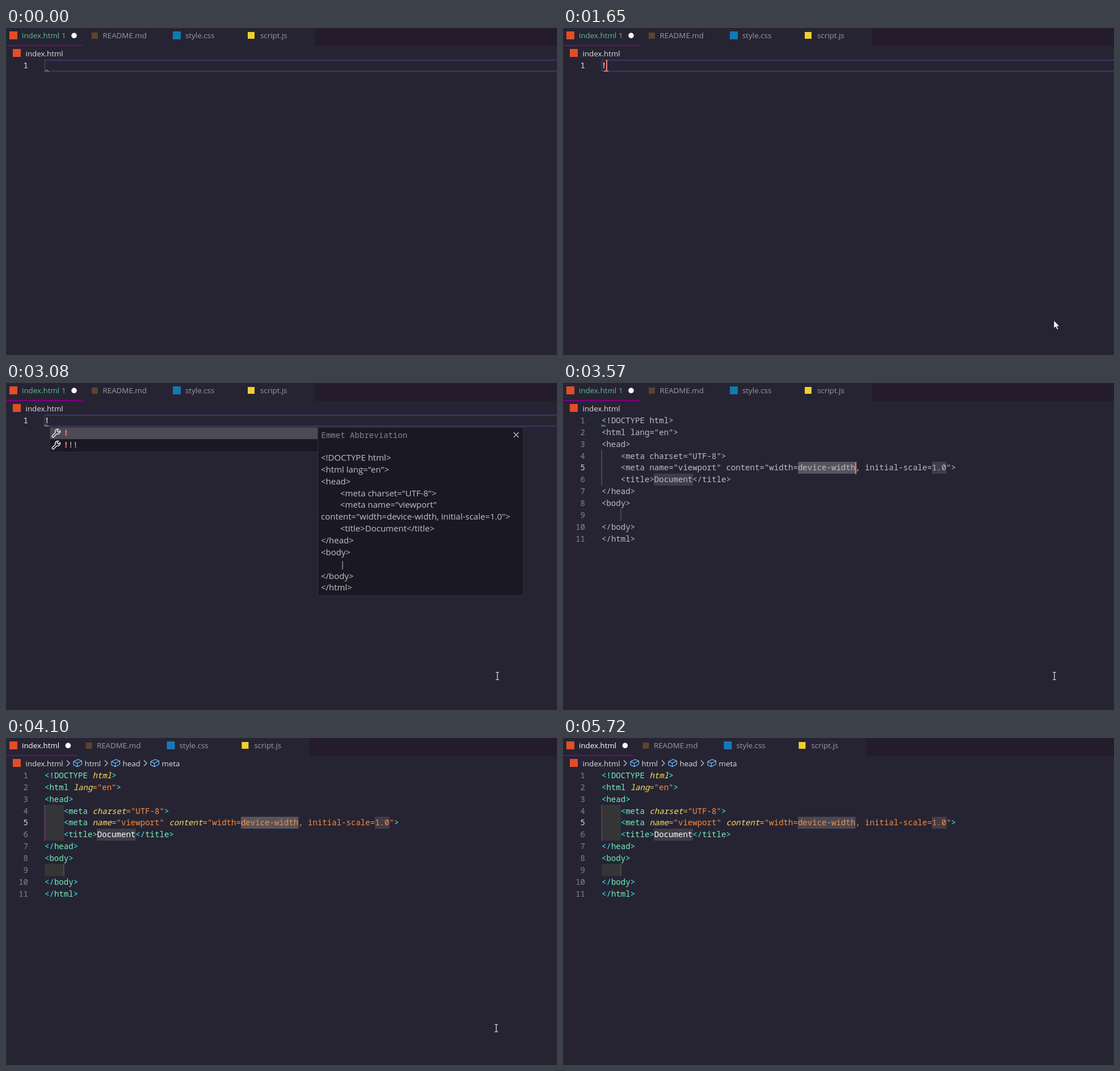
An HTML page that plays this animation: 971x577 px, repeating every 5.78 s.

```html
<!DOCTYPE html>
<html lang="en">
<head>
<meta charset="UTF-8">
<title>Editor abbreviation</title>
<style>
html, body { margin: 0; width: 100%; height: 100%; overflow: hidden; background: #262433; }
svg { display: block; width: 971px; height: 577px; }
text { white-space: pre; }
.ui { font: 13.35px "Open Sans", sans-serif; }
.mono { font: 500 14.07px "Noto Sans Mono", monospace; }
.doc { font: 15px "Open Sans", sans-serif; fill: #c3c1c6; }
.dim { fill: #9b99a2; }
.light { fill: #dedce2; }
.line { fill: none; stroke-width: 1.2; }
#code { fill: #d8a868; }
#code .p { fill: #36f9f6; }
#code .s { fill: #ff8b39; }
#code .a { fill: #fede5d; font-style: italic; }
#code .t { fill: #72f1b8; }
#code .w { fill: #fff; }
#code.plain, #code.plain tspan { fill: #bdbbc0; font-style: normal; }
</style>
</head>
<body>
<svg viewBox="0 0 971 577">
  <rect width="971" height="577" fill="#262433"/>

  <g class="ui">
    <rect x="6" y="6" width="14" height="14" fill="#e44d26"/>
    <text id="tabName" x="28" y="18">index.html</text>
    <text id="problems" x="98" y="18" fill="#5cbd95">1</text>
    <rect id="underline" y="30" height="2" fill="#800085"/>
    <g id="tabs" class="dim">
      <circle cx="120" cy="13.3" r="4.8" fill="#fff"/>
      <rect x="151" y="8" width="11" height="11" fill="#5c432f"/>
      <text x="170.5" y="18">README.md</text>
      <rect x="294" y="6" width="14" height="14" fill="#1478b4"/>
      <text x="316" y="18">style.css</text>
      <rect x="426" y="7" width="12" height="12" fill="#efcf30"/>
      <text x="448" y="18">script.js</text>
      <rect x="545" width="460" height="32" fill="#241b2d"/>
    </g>
    <rect x="12" y="37" width="14" height="14" fill="#e44d26"/>
    <text class="light" x="34.5" y="50">index.html</text>
    <g id="crumbs" class="light"></g>
  </g>

  <g id="entry">
    <rect class="line" x="68.5" y="56.75" width="920" height="19.5" stroke="#463a70" style="stroke-width:1.5"/>
    <text class="mono light" x="39" y="71" text-anchor="end">1</text>
    <text id="bang" class="mono" x="68" y="71" fill="#fff">!</text>
  </g>

  <g id="page">
    <g id="shade" fill="#353538">
      <rect x="68" y="118" width="34" height="63"/>
      <rect x="68" y="222.5" width="34" height="21"/>
    </g>
    <rect x="67.5" y="118" width="1.5" height="63" fill="#64466a"/>
    <rect x="101.5" y="222.5" width="1" height="21" fill="#68666c"/>
    <rect id="selected" x="414" y="139" width="101.5" height="21"/>
    <rect x="650" y="139" width="26" height="21" fill="#3f3d4a"/>
    <rect x="160" y="160" width="69" height="21" fill="#3f3d4a"/>
    <g id="numbers" class="mono" text-anchor="end"></g>
    <g id="code" class="mono"></g>
  </g>

  <path id="hint" class="line"/>

  <g id="popup">
    <rect x="77.5" y="78.5" width="472" height="43.5" fill="#1a1822" stroke="#35333f"/>
    <rect x="78" y="78.5" width="471" height="20.5" fill="#4c4a53"/>
    <g class="line" stroke="#e8e7ea" style="stroke-width:1.4">
      <path id="wrench" transform="translate(80 80) scale(1.05)" d="M12 1.5A4.3 4.3 0 0 0 6.6 7.2L1.6 12.2a1.7 1.7 0 0 0 2.4 2.4L9 9.4A4.3 4.3 0 0 0 14.5 4L11.8 6.6 9.4 4.2z"/>
      <use href="#wrench" y="21"/>
    </g>
    <g class="mono" fill="#c3c1c6">
      <text x="101.5" y="92.5" fill="#f97e72" font-weight="700">!</text>
      <text x="101.5" y="113.5"><tspan fill="#f97e72" font-weight="700">!</tspan>!!</text>
    </g>
    <rect x="549.5" y="78.5" width="362" height="297" fill="#1a1822" stroke="#35333f"/>
    <text class="mono" x="555.5" y="97" fill="#87858c">Emmet Abbreviation</text>
    <path class="line" stroke="#c8c6cb" d="M894.5 87l9 9m0-9l-9 9"/>
    <g id="doc" class="doc"></g>
  </g>

  <rect id="caret" width="2" height="21" fill="#f97e72"/>
  <path id="arrow" fill="#fff" stroke="#111" stroke-width=".7" d="M0 0v14l3.3-3 2.3 5.2 2.2-1-2.2-5h4.2z"/>
  <path id="beam" class="line" stroke="#e4e3e6" d="M-3-6.5h2.2l.8.7.8-.7h2.2M0-6v12.5M-3 6.5h2.2l.8-.7.8.7h2.2"/>
</svg>
<script>
const $ = id => document.getElementById(id);
const PITCH = 20.85, LOOP = 5780;
const lines = [
  '<!DOCTYPE html>', '<html lang="en">', '<head>',
  '    <meta charset="UTF-8">',
  '    <meta name="viewport" content="width=device-width, initial-scale=1.0">',
  '    <title>Document</title>',
  '</head>', '<body>', '    ', '</body>', '</html>'
];

const escape = s => s.replace(/</g, '&lt;').replace(/>/g, '&gt;');
const text = (x, y, body, extra = '') => `<text x="${x}" y="${y}" ${extra}>${body}</text>`;

// punctuation, string, attribute, tag name, plain word
const token = /(<[!\/]?|>)|("[^"]*")|([a-z]+(?==)|(?<=DOCTYPE )html)|((?<=[<!\/])\w+)|(\w+)/g;
const paint = line => line.replace(token, (m, ...groups) =>
  `<tspan class="${'psatw'[groups.slice(0, 5).findIndex(Boolean)]}">${escape(m)}</tspan>`);

$('code').innerHTML = lines.map((l, i) => text(68, 71 + PITCH * i, paint(l))).join('');
$('numbers').innerHTML = lines.map((l, i) =>
  text(39, 71 + PITCH * i, i + 1, `fill="${i === 4 ? '#d8d6dc' : '#85838d'}"`)).join('');

const docLines = lines.join('\n').replace(' content', '\ncontent').split('\n');
$('doc').innerHTML = docLines.map((l, i) =>
  text(l.startsWith(' ') ? 589 : 555, 137 + PITCH * i, escape(l.trim() || '|'))).join('');

$('crumbs').innerHTML = [['html', 139], ['head', 206], ['meta', 275]].map(([name, x]) =>
  `<path class="line" stroke="#c8c6cb" d="M${x - 32} 39.5l5 5-5 5"/>
   <path class="line" stroke="#75beff" d="M${x - 20} 41.5l8-3.5 6.500 2.500v6l-8 4-6.500-3zl6.500 3v6m0-6l8-4"/>` +
  text(x - .5, 50, name)).join('');

const show = (id, on) => $(id).style.display = on ? '' : 'none';
const set = (id, attrs) => { for (const k in attrs) $(id).setAttribute(k, attrs[k]); };
const clamp = v => Math.max(0, Math.min(1, v));
const mix = (a, b, p) => a + (b - a) * p;

const blinks = [350, 820, 1290, 2110, 2600, 3080, 3570, 4100, 4570, 5030, 5530, 5720];

function draw(t) {
  const typed = t >= 1650, expanded = t >= 3570, coloured = t >= 3620, parsed = t >= 3860;

  show('entry', !expanded);
  show('bang', typed);
  show('page', expanded);
  show('popup', t >= 1730 && !expanded);
  show('shade', t >= 3680);
  $('code').setAttribute('class', coloured ? 'mono' : 'mono plain');
  set('selected', { fill: t >= 5720 ? '#494854' : '#56555e' });

  show('problems', !parsed);
  show('crumbs', parsed);
  set('tabName', { fill: parsed ? '#fff' : '#5cbd95' });
  set('underline', { width: parsed ? 124 : 134.5 });
  set('tabs', { transform: `translate(${parsed ? -10.6 : 0})` });

  show('hint', !parsed);
  const fresh = typed && t < 1830;
  set('hint', {
    d: !typed ? 'M68 76.5l2 0 2-2.5 2 2.5h2'
      : fresh ? 'M72 76.5l2 0 2-2.5 2 2.5h2' : 'M67.5 73.5l2 3 2-2.5 2 2.5 2-1.5',
    stroke: fresh ? '#d9c8c4' : '#4cb8a4'
  });

  show('caret', blinks.filter(b => b <= t).length % 2);
  set('caret', { x: expanded ? 515 : typed ? 76 : 67, y: expanded ? 139.5 : 56 });

  const pointing = t < 1750;
  show('arrow', t >= 20 && pointing);
  const enter = 1 - (1 - clamp((t - 20) / 230)) ** 2;
  set('arrow', { transform: `translate(${mix(873, 865, enter)} ${mix(533, 516, enter)})` });

  show('beam', !pointing && t < 4240);
  const drift = clamp((t - 3960) / 140);
  const leave = t < 4160 ? 0 : (Math.floor((t - 4160) / 20) + 1) / 4;
  set('beam', {
    transform: `translate(${mix(866, 864, drift) + 29 * leave} ${mix(517, 512, drift) + 30 * leave})`
  });
}

const start = performance.now();
function tick() {
  draw((performance.now() - start) % LOOP);
  requestAnimationFrame(tick);
}
tick();
</script>
</body>
</html>
```
